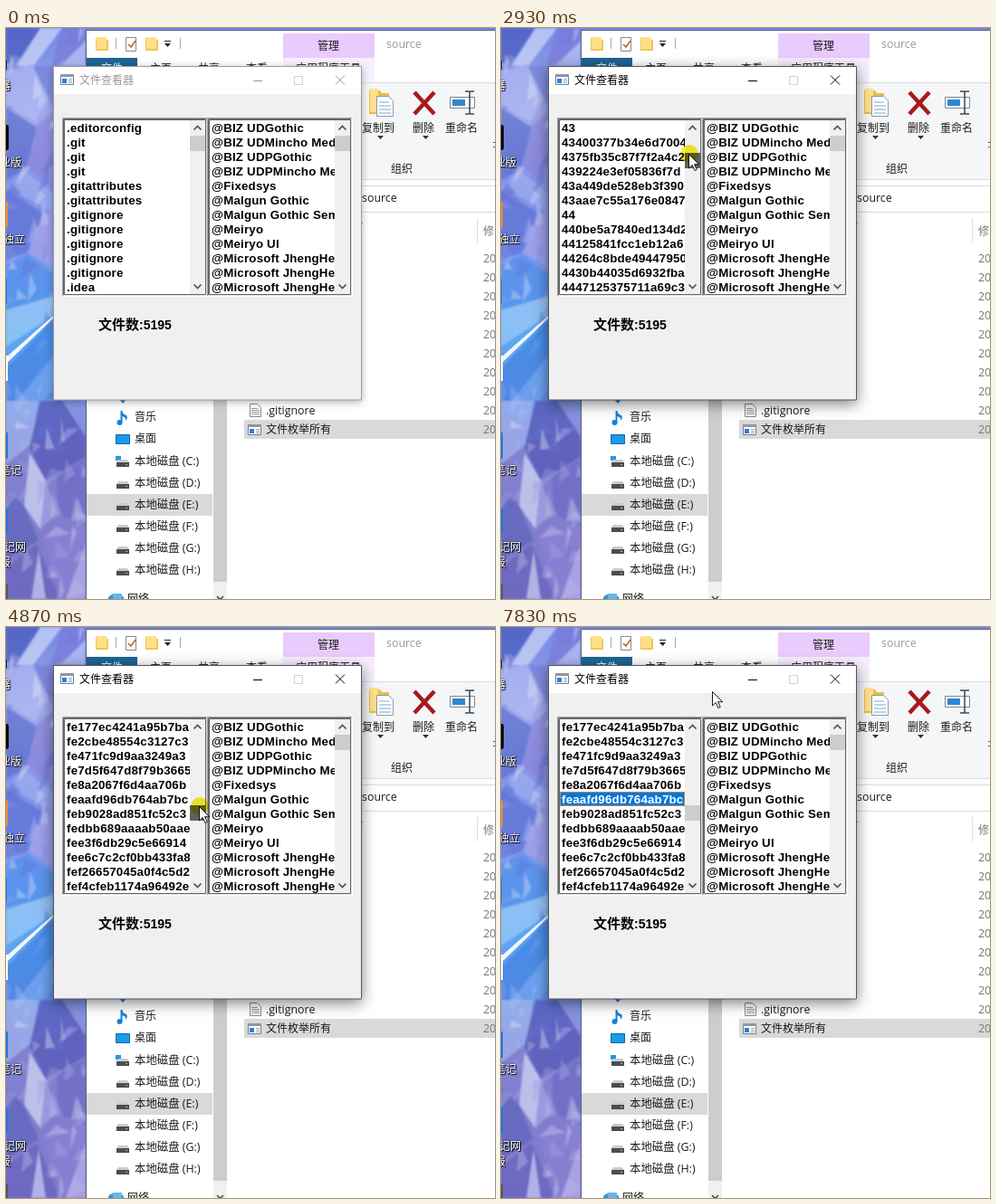
Animation of 540x631 px, one loop 8000 ms. Source, as an HTML page:

```html
<!DOCTYPE html>
<html lang="zh-CN">
<head>
<meta charset="utf-8">
<title>文件查看器</title>
<style>
html, body { margin: 0; width: 100%; height: 100%; overflow: hidden; }
#stage { display: block; width: 540px; height: 631px; }
text { font: 12px "Open Sans", "Noto Sans CJK SC", "Noto Sans CJK", sans-serif; fill: #1b1b1b; }
.latin { font-size: 12.4px; }
.soft { fill: #777; }
.label { fill: #fff; text-shadow: 1px 1px 1px #000, 0 0 2px #000; }
.row { font: bold 13.3px "Liberation Sans", Arial, sans-serif; letter-spacing: .2px; fill: #000; }
.row.picked { fill: #fff; }
.count { font: bold 14px "Liberation Sans", "Noto Sans CJK SC", "Noto Sans CJK", sans-serif; fill: #000; }
.count .cn { font-size: 15px; }
.line { fill: none; stroke: #505050; stroke-width: 1.7; }
#facets { opacity: .6; filter: blur(.8px); }
#frame { fill: #f0f0f0; stroke: #9a9a9a; filter: drop-shadow(0 2px 4px rgba(0,0,0,.3)); }
#title { fill: #999; }
#controls { stroke: #999; }
.active #frame { stroke: #505560; filter: drop-shadow(0 4px 8px rgba(0,0,0,.5)); }
.active #title { fill: #000; }
.active #controls { stroke: #000; }
#halo { fill: #f8ee34; mix-blend-mode: multiply; }
</style>
</head>
<body>
<svg id="stage" viewBox="0 0 540 631">
  <defs>
    <linearGradient id="sky" x2="0" y2="1">
      <stop offset="0" stop-color="#7388e4"/>
      <stop offset=".15" stop-color="#a0a9ec"/>
      <stop offset=".3" stop-color="#7f8fe6"/>
      <stop offset=".42" stop-color="#7f9cf0"/>
      <stop offset=".53" stop-color="#5aa6f2"/>
      <stop offset=".63" stop-color="#6f9cee"/>
      <stop offset=".72" stop-color="#8083d2"/>
      <stop offset="1" stop-color="#8279cc"/>
    </linearGradient>
    <g id="folder">
      <path d="M0 1h5l1 2h8v12H0z" fill="#efc657"/>
      <path d="M1 0h11v13H1z" fill="#ffe08a"/>
    </g>
    <g id="disk">
      <path d="M2 0h10l2 3H0z" fill="#c9cbce"/>
      <path d="M0 3h14v5H0z" fill="#4a4d52"/>
      <path d="M10 5h2v1h-2z" fill="#7fe08d"/>
    </g>
    <g id="app">
      <path d="M.5.5h14v11H.5z" fill="#fff" stroke="#6d7a8a"/>
      <path d="M0 0h15v3H0z" fill="#8a97a8"/>
      <path d="M2 5h5v5H2z" fill="#2d7fd0"/>
      <path d="M9 5.5h4M9 7.5h4M9 9.5h4" stroke="#9aa5b2"/>
    </g>
    <!-- sunken list box with its scroll bar -->
    <g id="box">
      <path d="M0 0h161v198H0z" fill="#fff"/>
      <path d="M.5 197V.5H160" fill="none" stroke="#a0a0a0"/>
      <path d="M1.500 196V1.500H159" fill="none" stroke="#696969"/>
      <path d="M159.500 1v195.500H1" fill="none" stroke="#e3e3e3"/>
      <path d="M2.500 2.500h156v193h-156z" fill="none" stroke="#646464"/>
      <path d="M141 3h17v192h-17z" fill="#f0f0f0"/>
      <path class="line" d="M145.500 13.500l4-4 4 4"/>
    </g>
  </defs>

  <g id="wallpaper">
    <path d="M0 0h540v631H0z" fill="url(#sky)"/>
    <g id="facets">
      <path d="M0 0h38L8 44 0 36z" fill="#3f50b4"/>
      <path d="M38 0h24L30 42H12z" fill="#dce7fc"/>
      <path d="M62 0h26v24L50 42z" fill="#7d78d8"/>
      <path d="M88 14v28H60z" fill="#c5cdf7"/>
      <path d="M0 48l30-8 22 30-20 34L0 84z" fill="#b4bef3"/>
      <path d="M30 42h22v46z" fill="#7480d6"/>
      <path d="M0 88l34 22-12 46-22 12z" fill="#5266c6"/>
      <path d="M34 108l18-16v84L24 154z" fill="#8a80d8"/>
      <path d="M20 158l32 24v22L0 176z" fill="#a3b4f2"/>
      <path d="M0 180l40 24-16 44-24 8z" fill="#566cd0"/>
      <path d="M42 206l10-4v62l-28-16z" fill="#b0a4e6"/>
      <path d="M0 262l24-12 28 22v26L0 310z" fill="#4a8eea"/>
      <path d="M0 312l52-16v22L0 352z" fill="#a8d2f8"/>
      <path d="M0 376l52-52v88H0z" fill="#3a7ee0"/>
      <path d="M12 412l40-50v50z" fill="#6aa2ee"/>
      <path d="M0 412h36l-8 48-28 22z" fill="#a6bdf2"/>
      <path d="M38 412h50v62L44 500 26 464z" fill="#4c4eb0"/>
      <path d="M62 412h26v40z" fill="#8f94e0"/>
      <path d="M26 470l18 30-6 54-18-26z" fill="#e4ebfc"/>
      <path d="M44 500l12 36-18 18z" fill="#a6aee8"/>
      <path d="M56 494l32-18v74l-30-12z" fill="#6c66c4"/>
      <path d="M0 510l20 18 16 38-36 22z" fill="#5660b8"/>
      <path d="M40 560l48-10v81H62z" fill="#8f82d6"/>
      <path d="M66 631l22-62v62z" fill="#c2bcf0"/>
      <path d="M0 596l34-26 26 61H0z" fill="#625eba"/>
      <path d="M28 631l8-54 8 54z" fill="#d0d8f8"/>
    </g>
    <path d="M0 364l52-46v3L0 371z" fill="#f0f8ff"/>
    <path d="M0 36h1v10H0z" fill="#222"/>
    <path d="M0 107h1q2 0 2 3v22q0 3-2 3H0z" fill="#0a0a0a"/>
    <path d="M0 192h2v28H0z" fill="#ef8b2c"/>
    <path d="M0 277h1v28H0zM0 447h2v29H0zM0 531h2v28H0z" fill="#1f7ad8"/>
    <path d="M0 362h2v28H0z" fill="#fff"/>
    <path d="M0 615h2v16H0z" fill="#555"/>
  </g>
  <g id="labels"></g>

  <g id="explorer">
    <path d="M88.500 640V2.500H541V640z" fill="#fff" stroke="#56617c"/>
    <use href="#folder" x="99" y="10"/>
    <use href="#folder" x="154" y="10"/>
    <path d="M121.500 11v12M192.500 11v12" stroke="#aaa"/>
    <path d="M132.500 10.500h11v15h-11z" fill="#fff" stroke="#888"/>
    <path d="M135 18l3 3 5-7" fill="none" stroke="#c8622b" stroke-width="1.600"/>
    <path d="M175 14.500h7" stroke="#222"/>
    <path d="M175 17h7l-3.500 4z" fill="#222"/>
    <path d="M306 6h101v27H306z" fill="#e9cbfd"/>
    <path d="M306 33h101v27H306z" fill="#f8effe"/>
    <path d="M89 33h56v27H89z" fill="#1d6596"/>
    <path d="M89 60h451v107H89z" fill="#f5f6f7"/>
    <path d="M393 60.500h147M393 167.500h147" stroke="#dcdde0"/>
    <path d="M393 174.500h147M393 203.500h147" stroke="#d9d9d9"/>
    <!-- ribbon icons -->
    <path d="M401 69h12l2 3h8v23h-22z" fill="#e9bd4c"/>
    <path d="M402 67h9v26h-9z" fill="#ffe08c"/>
    <path d="M409.500 75.500h13l5 5v17h-18z" fill="#fff" stroke="#8d99a6"/>
    <path d="M412 82h11M412 86h13M412 90h13M412 94h13" stroke="#76a7d5"/>
    <path d="M451 71l22 24M473 71l-22 24" stroke="#a81a1a" stroke-width="4.500"/>
    <path d="M490.500 76.500h27v12h-27z" fill="#fff" stroke="#7d8894"/>
    <path d="M493 79h14v7h-14z" fill="#2f87cf"/>
    <path d="M507 70h4l1 1 1-1h4M512 71v23M507 95h4l1-1 1 1h4" fill="none" stroke="#3b4651" stroke-width="1.500"/>
    <path d="M410 119h7l-3.500 4zM460 119h7l-3.500 4z" fill="#333"/>
    <path d="M538 126h2v1h-2zM538 131h2v1h-2z" fill="#555"/>
    <path d="M388 216l3-3 3 3" fill="none" stroke="#777"/>
    <path d="M520.500 210v27" stroke="#dedede"/>
    <!-- file rows -->
    <path d="M263 433h277v21H263z" fill="#d9d9d9"/>
    <path d="M269.500 415.500h8l4 4v10h-12z" fill="#fff" stroke="#888"/>
    <path d="M271 420.500h7M271 422.500h9M271 424.500h9M271 426.500h9" stroke="#999"/>
    <use href="#app" x="267" y="438"/>
    <!-- navigation -->
    <path d="M89 515h139v24H89z" fill="#d9d9d9"/>
    <path d="M229 400h15v231h-15z" fill="#f0f0f0"/>
    <path d="M229 400h15v212h-15z" fill="#cdcdcd"/>
    <path class="line" d="M233 628l3.500 3.500 3.500-3.500"/>
    <path d="M123 408h12l-6 7z" fill="#2a80c8"/>
    <path d="M127.500 423v13" stroke="#1683d8" stroke-width="2"/>
    <path d="M128 423q1 4 5 5 2 3-1 6 1-4-4-5z" fill="#1683d8"/>
    <circle cx="125.500" cy="436" r="3" fill="#1683d8"/>
    <path d="M121.500 449.500h15v10h-15z" fill="#1a9be8" stroke="#0d67ad"/>
    <path d="M121 473h6v5h-6z" fill="#1f9ae0"/>
    <path d="M113 629q8-8 17 0v4h-17z" fill="#3496d8"/>
    <path d="M118 625h10v6h-10z" fill="#65b7e8"/>
  </g>
  <g id="captions"></g>

  <g id="viewer">
    <path id="frame" d="M52.500 42.500h340v368.500h-340z"/>
    <path d="M53 43h339v30H53z" fill="#fff"/>
    <use href="#app" x="60" y="51"/>
    <text id="title" x="81" y="62">文件查看器</text>
    <g fill="none">
      <path d="M318.500 53.500h9v9h-9z" stroke="#cfcfcf"/>
      <path id="controls" d="M273 58.500h10M364 52.500l10 10M374 52.500l-10 10"/>
    </g>
    <use href="#box" x="62" y="99"/>
    <use href="#box" x="222" y="99"/>
    <path id="hover" d="M203 277h17v17h-17z" fill="#dadada"/>
    <path id="down" class="line" d="M207.500 283.500l4 4 4-4"/>
    <path class="line" d="M367.500 283.500l4 4 4-4"/>
    <rect id="thumb" x="203" width="17" height="17"/>
    <path d="M363 119h17v17h-17z" fill="#cdcdcd"/>
    <svg x="65" y="102" width="138" height="192">
      <g id="pick">
        <path d="M0 0h138v16H0z" fill="#0078d7"/>
        <path d="M.5.5h137v15H.5z" fill="none" stroke="#ff8728" stroke-dasharray="2 .6"/>
      </g>
      <g id="files"></g>
    </svg>
    <svg x="225" y="102" width="138" height="192"><g id="fonts"></g></svg>
    <text class="count" x="102" y="333"><tspan class="cn">文件数</tspan>:5195</text>
  </g>

  <circle id="halo" r="10"/>
  <path id="cursor" d="M.5.5v15.500l3.700-3.500 2.700 6 2.300-1-2.600-5.800h5z" fill="#fff" stroke="#000" stroke-width=".9"/>
</svg>

<script>
const $ = id => document.getElementById(id);
const NS = "http://www.w3.org/2000/svg";

function add(parent, tag, attrs, content = "") {
  const el = document.createElementNS(NS, tag);
  for (const key in attrs) el.setAttribute(key, attrs[key]);
  el.textContent = content;
  return $(parent).appendChild(el);
}
const write = (parent, x, y, str, cls = "") => add(parent, "text", { x, y, class: cls }, str);
const repeat = (n, str) => Array(n).fill(str);

// small crystal glints over the large facets
let seed = 7;
const rand = max => (seed = seed * 16807 % 2147483647) / 2147483647 * max;
const tints = ["#fff", "#dfe8ff", "#4f62cc", "#b9b4f2"];
for (let i = 0; i < 90; i++) {
  const x = rand(88), y = rand(631), w = 4 + rand(12), h = 8 + rand(26);
  add("facets", "path", {
    d: `M${x} ${y}l${w} ${rand(h)}L${x + rand(w) - w} ${y + h}z`,
    fill: tints[i % tints.length], opacity: .2 + rand(.4)
  });
}

// desktop labels end at a given right edge
[[5, 68, "器"], [17, 153, "业版"], [21, 238, "独立"], [17, 493, "笔记"], [22, 578, "记网"], [5, 595, "报"]]
  .forEach(([right, y, str]) => write("labels", right - 12 * str.length, y, str, "label"));

[[344, 24, "管理"], [320, 49, "应用程序工具"], [159, 49, "主页"], [212, 49, "共享"], [265, 49, "查看"],
 [393, 115, "复制到"], [449, 115, "删除"], [485, 115, "重命名"], [425, 160, "组织"],
 [287, 448, "文件枚举所有"], [142, 410, "下载"], [142, 434, "音乐"], [142, 458, "桌面"], [134, 635, "网络"]]
  .forEach(([x, y, str]) => write("captions", x, y, str));
write("captions", 105, 49, "文件", "label").style.textShadow = "none";
write("captions", 420, 22, "source", "latin").style.fill = "#999";
write("captions", 393, 192, "source", "latin");
write("captions", 287, 427, ".gitignore", "latin");
write("captions", 527, 229, "修", "soft");
for (let i = 0; i < 10; i++) write("captions", 527, 259 + 21 * i, "20", "latin soft");
[..."CDEFGH"].forEach((letter, i) => {
  const y = 479 + 24 * i;
  add("captions", "use", { href: "#disk", x: 122, y: y - 2 });
  write("captions", 142, y + 4, `本地磁盘 (${letter}:)`, "latin");
});

const dots = [".editorconfig", ...repeat(3, ".git"), ...repeat(2, ".gitattributes"),
  ...repeat(5, ".gitignore"), ".idea", ...repeat(3, ".suo")];
const lists = {
  top: dots.slice(0, 12),
  next: dots.slice(3),
  four: `43 43400377b34e6d7004 4375fb35c87f7f2a4c2 439224e3ef05836f7d 43a449de528eb3f390
    43aae7c55a176e0847 44 440be5a7840ed134d2 44125841fcc1eb12a6 44264c8bde49447950
    4430b44035d6932fba 4447125375711a69c3`.split(/\s+/),
  a: `a8 a867fcc9bfc08d98533 a8779a724c3bd4edb0 a89133001929e6d835 a89d0d03b42051a702
    a8b3c619bc16d7ef86 a8d74c954d826f2a13 a8df929f9c9239caa8 a8fdeb362257c1c09b a9
    a9025cc80ebdadfcfa9 a92e2d21eaafbe8adb`.split(/\s+/),
  f: `fe177ec4241a95b7ba fe2cbe48554c3127c3 fe471fc9d9aa3249a3 fe7d5f647d8f79b3665
    fe8a2067f6d4aa706b feaafd96db764ab7bc feb9028ad851fc52c3 fedbb689aaaab50aae
    fee3f6db29c5e66914 fee6c7c2cf0bb433fa8 fef26657045a0f4c5d2 fef4cfeb1174a96492e`.split(/\s+/)
};
const fonts = ["BIZ UDGothic", "BIZ UDMincho Medium", "BIZ UDPGothic", "BIZ UDPMincho Medium", "Fixedsys",
  "Malgun Gothic", "Malgun Gothic Semilight", "Meiryo", "Meiryo UI", ...repeat(3, "Microsoft JhengHei")];

const rowY = i => 13 + 16 * i;
fonts.forEach((name, i) => write("fonts", 2, rowY(i), "@" + name, "row"));
const rows = lists.top.map((_, i) => write("files", 2, rowY(i), "", "row"));

const LOOP = 8000;
const steps = [
  { at: 0, list: "top", thumb: 119 },
  { at: 950, list: "top", thumb: 119, x: 210, y: 287, hover: true },
  { at: 1950, list: "next", thumb: 119, x: 211, y: 142, down: true },
  { at: 2930, list: "four", thumb: 138, x: 207, y: 139, drag: true },
  { at: 3890, list: "a", thumb: 158, x: 207, y: 159, drag: true },
  { at: 4870, list: "f", thumb: 197, x: 213, y: 198, drag: true },
  { at: 5870, list: "f", thumb: 197, x: 157, y: 191, pick: 7 },
  { at: 6850, list: "f", thumb: 197, x: 294, y: 26, pick: 5 },
  { at: 7830, list: "f", thumb: 197, x: 233, y: 71, pick: 5 }
];

const show = (id, on) => $(id).setAttribute("visibility", on ? "visible" : "hidden");
const move = (id, x, y) => $(id).setAttribute("transform", `translate(${x} ${y})`);

function draw(s) {
  $("stage").classList.toggle("active", s.at >= 1950);
  rows.forEach((row, i) => {
    row.textContent = lists[s.list][i];
    row.classList.toggle("picked", s.pick === i);
  });
  show("pick", s.pick !== undefined);
  move("pick", 0, 16 * (s.pick || 0));
  $("thumb").setAttribute("y", s.thumb);
  $("thumb").setAttribute("fill", s.drag ? "#606060" : "#cdcdcd");
  show("hover", s.hover);
  $("down").style.stroke = s.hover || s.down ? "#000" : "";
  show("cursor", s.x !== undefined);
  move("cursor", s.x || 0, s.y || 0);
  show("halo", s.drag);
  move("halo", (s.x || 0) + 1, s.y || 0);
}

const start = performance.now();
let current;
function tick() {
  const t = (performance.now() - start) % LOOP;
  const step = steps.findLast(s => s.at <= t);
  if (step !== current) draw(current = step);
  requestAnimationFrame(tick);
}
tick();
</script>
</body>
</html>
```
